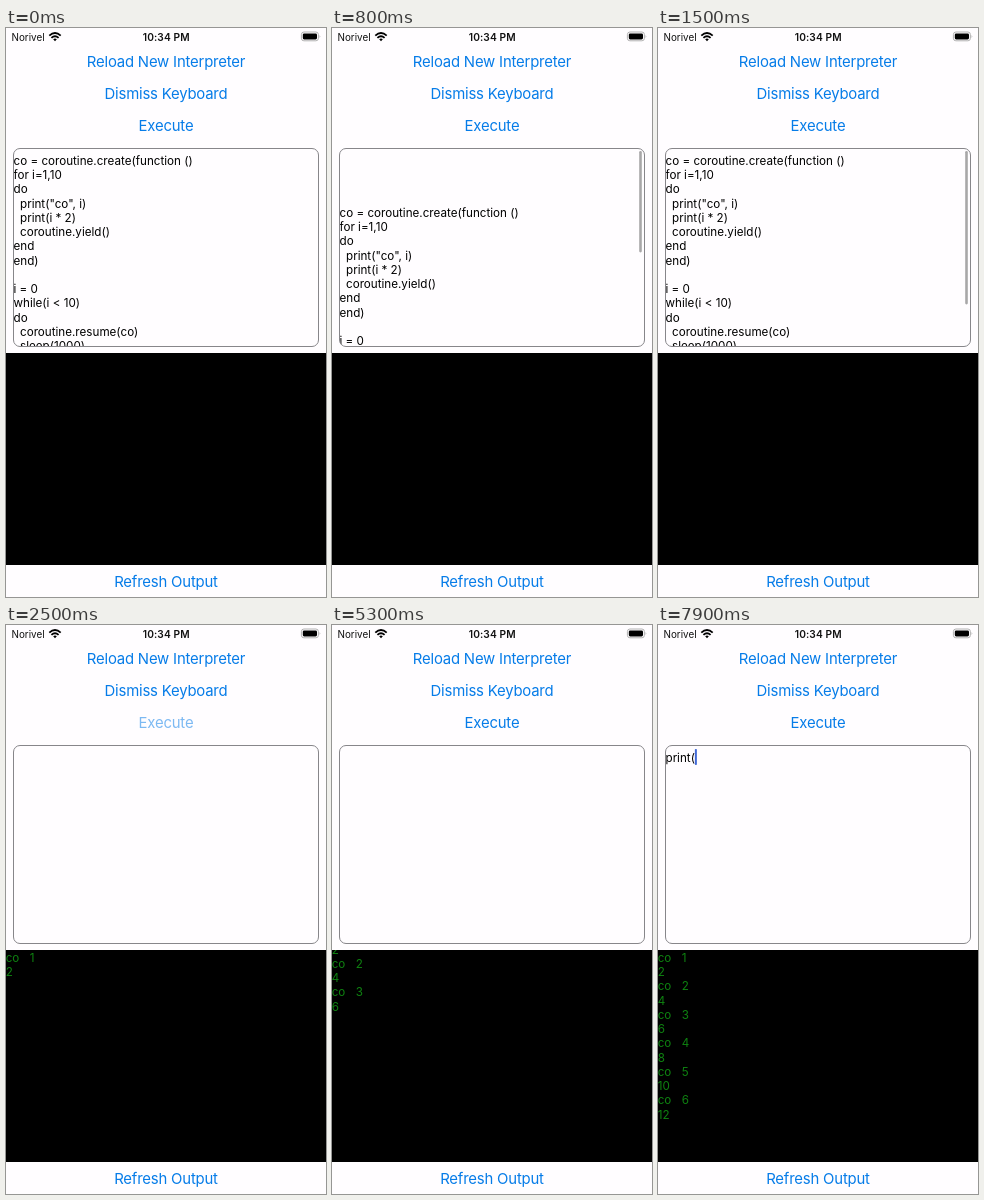
Animation of 320 by 569 pixels, one loop 8000 ms. Source, as an HTML page:

```html
<!DOCTYPE html>
<html lang="en">
<head>
<meta charset="utf-8">
<title>Lua interpreter demo</title>
<style>
  html, body { margin: 0; width: 100%; height: 100%; overflow: hidden; background: #fffdff; }
  svg { display: block; width: 100vw; height: 100vh; }
  text { font-family: Inter, "Liberation Sans", sans-serif; white-space: pre; }
  .button { font-size: 14.9px; letter-spacing: -.013em; fill: #067ce8; text-anchor: middle; }
  .code { font-size: 11.65px; fill: #000; }
  .out { font-size: 11.65px; fill: #0e8210; }
  .status { font-size: 9.9px; fill: #111; }
  .clock { font-size: 10.2px; font-weight: 600; letter-spacing: .01em; text-anchor: middle; }
</style>
</head>
<body>
<svg viewBox="0 0 320 569">
  <defs>
    <clipPath id="editorClip"><rect x="7" y="120.5" width="306" height="198" rx="7"/></clipPath>
    <clipPath id="consoleClip"><rect y="325" width="320" height="212"/></clipPath>
  </defs>
  <rect width="320" height="569" fill="#fffdff"/>

  <text class="status" x="5.5" y="12.8">Norivel</text>
  <g fill="none" stroke="#000" stroke-width="1.8">
    <path d="M43.3 7.6Q49 2.3 54.7 7.6M45.4 9.9Q49 6.6 52.6 9.9"/>
    <path d="M47.2 11.3Q49 9.8 50.8 11.3L49 13.2Z" fill="#000" stroke="none"/>
  </g>
  <text class="status clock" x="160.2" y="12.8">10:34 PM</text>
  <rect x="295.4" y="4" width="17" height="8.8" rx="2.5" fill="none" stroke="#aaa" stroke-width=".9"/>
  <rect x="296.8" y="5.4" width="14.2" height="6" rx="1.4"/>
  <path d="M313.6 6.9q1.6 1.5 0 3z" fill="#aaa"/>

  <text class="button" x="160" y="39">Reload New Interpreter</text>
  <text class="button" x="160" y="71">Dismiss Keyboard</text>
  <text class="button" x="160" y="103" id="execute">Execute</text>
  <text class="button" x="160" y="559">Refresh Output</text>

  <g clip-path="url(#editorClip)">
    <g id="script"></g>
    <text class="code" id="typed" x="7.5" y="136.8"></text>
    <rect id="caret" y="124" width="2" height="16" rx=".8" fill="#4169d6"/>
    <rect id="bar" x="307.2" y="123" width="2.6" rx="1.3" fill="#a8a7a8"/>
  </g>
  <rect x="7.5" y="120.5" width="305" height="198" rx="6.5" fill="none" stroke="#87868a" stroke-width="1"/>

  <rect y="325" width="320" height="212"/>
  <g clip-path="url(#consoleClip)"><g id="output"></g></g>
</svg>
<script>
const LOOP = 8000, STEP = 100, LINE = 14.256;
const LEFT = 7.5, TOP = 136.8;
const $ = id => document.getElementById(id);

const source = `co = coroutine.create(function ()
for i=1,10
do
  print("co", i)
  print(i * 2)
  coroutine.yield()
end
end)

i = 0
while(i < 10)
do
  coroutine.resume(co)
  sleep(1000)`;

const prints = [2400, 3400, 4400, 5400, 6500, 7500];
const keys = [7000, 7100, 7200, 7400, 7600, 7900];
// Scroll offsets, one value per step from the given start
const pull = { start: 500, values: [6, 20, 37, 52, 61, 63, 50, 30, 14, 5, 0] };
const lift = { start: 5300, values: [22.5, 24.4, 24.4, 24.4, 15, 7, 3, 1, 0] };

const passed = (times, t) => times.filter(at => at <= t).length;
const offset = (track, t) => track.values[(t - track.start) / STEP] || 0;
const show = (el, on) => el.setAttribute("visibility", on ? "visible" : "hidden");

function addText(parent, cls, x, y, content) {
  const el = document.createElementNS("http://www.w3.org/2000/svg", "text");
  el.setAttribute("class", cls);
  el.setAttribute("x", x);
  el.setAttribute("y", y);
  el.textContent = content;
  parent.append(el);
  return el;
}

source.split("\n").forEach((line, i) => addText($("script"), "code", LEFT, TOP + i * LINE, line));

const results = prints.map((_, i) => {
  const y = 336.9 + 2 * i * LINE;
  return [
    addText($("output"), "out", -.3, y, "co"),
    addText($("output"), "out", 23.8, y, i + 1),
    addText($("output"), "out", -.3, y + LINE, 2 * (i + 1))
  ];
});

function draw(t) {
  const drag = offset(pull, t);
  $("script").setAttribute("transform", `translate(0 ${drag})`);
  show($("script"), t < 2400);
  $("bar").setAttribute("height", 153.4 - drag);
  show($("bar"), t >= 500 && t < 2400);

  const fade = t < 2300 ? 1 : Math.min(1, .2 + .8 * (t - 2300) / 500);
  $("execute").setAttribute("opacity", fade);

  $("output").setAttribute("transform", `translate(0 ${-offset(lift, t)})`);
  const count = passed(prints, t);
  results.forEach((row, i) => row.forEach(el => show(el, i < count)));

  const typed = "print(".slice(0, passed(keys, t));
  $("typed").textContent = typed;
  const width = typed ? $("typed").getComputedTextLength() : 0;
  $("caret").setAttribute("x", LEFT + width);
  show($("caret"), t >= 6500);
}

const begin = performance.now();
function tick() {
  const t = (performance.now() - begin) % LOOP;
  draw(Math.floor(t / STEP) * STEP);
  requestAnimationFrame(tick);
}
tick();
</script>
</body>
</html>
```
